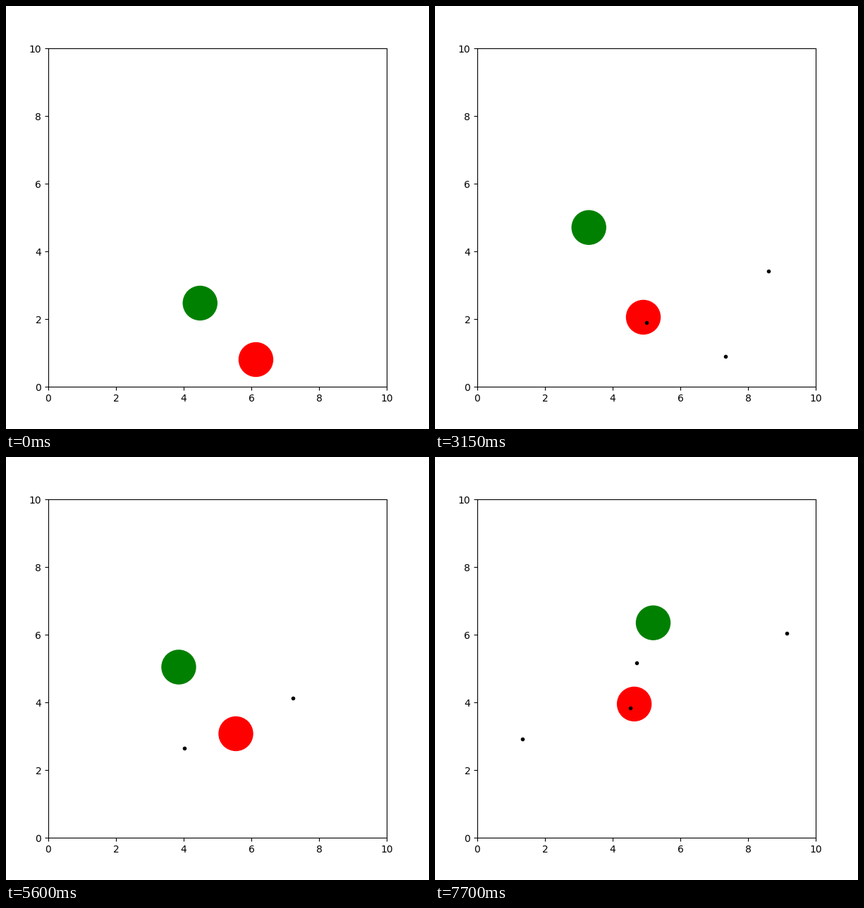
A matplotlib script for the animation above (8000 ms loop, 600 px wide and 600 px high).

```python
import numpy as np
import matplotlib.pyplot as plt
from matplotlib.animation import FuncAnimation
from matplotlib.patches import Circle

TICK, STEP, LOOP = 50, 350, 8000  # ms
RADIUS = 0.5
SHOT_SPEED, SHOT_GAP = 0.45, 4
SHOT_ANGLES = np.radians([46.8, -13.1, 45, 174, 111.8, 158.7])

# Turning points: step, x, y
GREEN_TURNS = [(0, 4.485, 2.47), (5, 4.09, 3.715), (9, 3.296, 4.704),
               (13, 3.133, 5.615), (14, 3.38, 5.52), (16, 3.854, 5.042),
               (20, 4.823, 5.85), (22, 5.198, 6.35)]
RED_TURNS = [(0, 6.135, 0.802), (1, 6.014, 0.865), (8, 5.0, 1.906),
             (9, 4.906, 2.053), (13, 5.508, 2.646), (16, 5.542, 3.073),
             (20, 4.942, 3.673), (22, 4.638, 3.95)]


def walk(turns, step):
    steps, xs, ys = zip(*turns)
    return np.array([np.interp(step, steps, xs), np.interp(step, steps, ys)])


def shots_at(step):
    """Every shot starts where red stood and flies straight on."""
    points = []
    for i, angle in enumerate(SHOT_ANGLES):
        fired = SHOT_GAP * i
        if step > fired:
            flown = SHOT_SPEED * (step - fired - 1)
            heading = np.array([np.cos(angle), np.sin(angle)])
            points.append(walk(RED_TURNS, fired) + flown * heading)
    return np.array(points).reshape(-1, 2).T


fig, ax = plt.subplots(figsize=(6, 6), dpi=100)
fig.subplots_adjust(left=0.1, right=0.9, bottom=0.1, top=0.9)
ax.set_xlim(0, 10)
ax.set_ylim(0, 10)

red = ax.add_patch(Circle((0, 0), RADIUS, color="red"))
green = ax.add_patch(Circle((0, 0), RADIUS, color="green"))
shots, = ax.plot([], [], "k.")


def update(frame):
    step = frame * TICK // STEP
    red.center = walk(RED_TURNS, step)
    green.center = walk(GREEN_TURNS, step)
    shots.set_data(*shots_at(step))
    return red, green, shots


anim = FuncAnimation(fig, update, frames=LOOP // TICK, interval=TICK,
                     init_func=lambda: update(0), repeat=True, repeat_delay=0)
plt.show()
```
